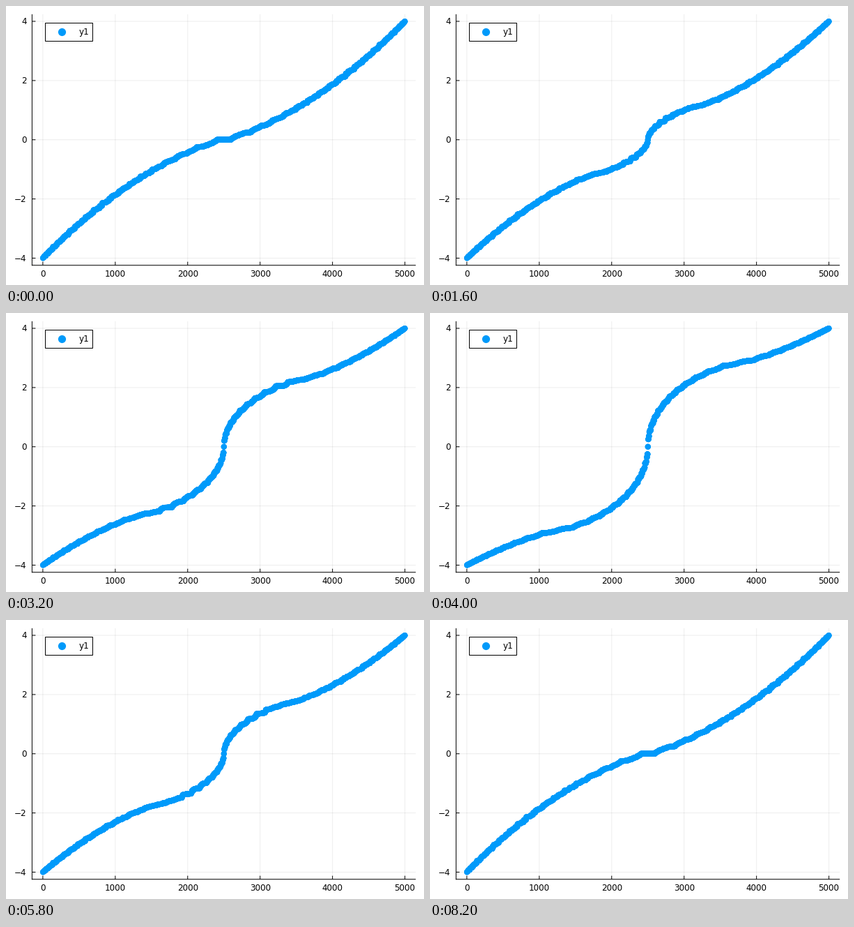
Write a matplotlib script that moves like this. It is 600x400 px and loops after 8.4 s.

```python
import numpy as np
import matplotlib.pyplot as plt
from matplotlib.animation import FuncAnimation
from matplotlib.patches import Rectangle

DPI = 100
PX = 72 / DPI  # points per pixel
W, H = 600, 400
LEFT, RIGHT, TOP, BOTTOM = 37.4, 588.2, 11.8, 371.7
BLUE = "#009afa"
SITES = 50
STEPS = 21
COUNT = 2 * SITES**2

plt.rcParams["font.family"] = "DejaVu Sans"


def to_px(value, low, high, start, end):
    """Map data to pixels with a 3 % margin at both ends."""
    pad = 0.03 * (high - low)
    return start + (value - low + pad) / (high - low + 2 * pad) * (end - start)


def x_px(x):
    return to_px(x, 1, COUNT, LEFT, RIGHT)


def y_px(y):
    return to_px(y, -4, 4, BOTTOM, TOP)


def spectrum(coupling):
    """Sorted two-band energies on a periodic square lattice."""
    k = 2 * np.pi * np.arange(SITES) / SITES
    kx, ky = np.meshgrid(k, k)
    hop = 2 * (np.cos(kx) + np.cos(ky))
    pair = coupling**2 * (np.sin(kx) ** 2 + np.sin(ky) ** 2)
    energy = np.sqrt(hop**2 + pair).ravel()
    return np.sort(np.concatenate([-energy, energy]))


fig = plt.figure(figsize=(W / DPI, H / DPI), dpi=DPI, facecolor="white")
ax = fig.add_axes([0, 0, 1, 1])
ax.set_xlim(0, W)
ax.set_ylim(H, 0)
ax.axis("off")


def line(xs, ys, alpha=1.0, z=2):
    ax.plot(xs, ys, color="black", lw=PX, alpha=alpha, zorder=z,
            solid_capstyle="butt", snap=False)


def label(x, y, text, align, z=2):
    ax.text(x, y + 4.4, text, fontsize=12 * PX, ha=align, va="baseline",
            color="black", zorder=z)


def dots(x, y, radius, z):
    sizes = np.full(len(x), (2 * radius * PX) ** 2)
    return ax.scatter(x, y, s=sizes, color=BLUE, linewidths=0, zorder=z)


for tick in range(0, 5001, 1000):
    x = x_px(tick)
    line([x, x], [TOP, BOTTOM], 0.07, 1)
    line([x, x], [BOTTOM - 5, BOTTOM])
    label(x, 383.2, str(tick), "center")

for tick in range(-4, 5, 2):
    y = y_px(tick)
    line([LEFT, RIGHT], [y, y], 0.07, 1)
    line([LEFT, LEFT + 5], [y, y])
    label(29.7, y, str(tick).replace("-", "\u2212"), "right")

line([LEFT, LEFT], [TOP, BOTTOM + 0.5])
line([LEFT - 0.5, RIGHT], [BOTTOM, BOTTOM])

levels = x_px(np.arange(1, COUNT + 1))
points = dots(levels, y_px(spectrum(0)), 4, 3)

# Legend
ax.add_patch(Rectangle((55.5, 23.5), 68.5, 26, facecolor="white",
                       edgecolor="black", lw=PX, zorder=4))
dots([80], [36.6], 5.6, 5)
label(104.2, 36.7, "y1", "left", 5)


def update(frame):
    step = min(frame, 2 * STEPS - 1 - frame)
    points.set_offsets(np.column_stack([levels, y_px(spectrum(0.1 * step))]))
    return (points,)


anim = FuncAnimation(fig, update, frames=2 * STEPS, interval=200,
                     repeat=True, repeat_delay=0, blit=False)
plt.show()
```
